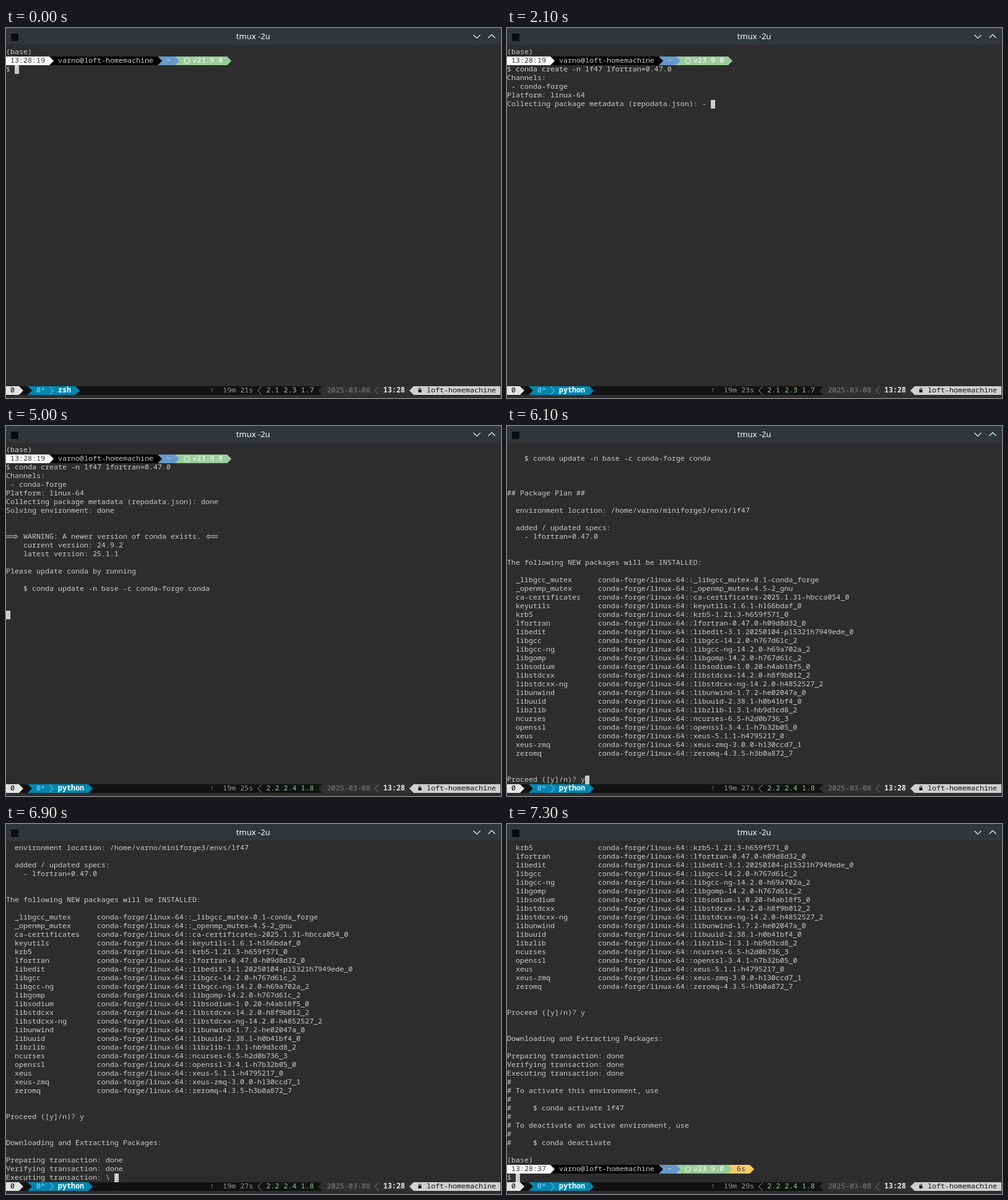
An HTML page that plays this animation: 799 by 597 pixels, repeating every 8 s.

```html
<!DOCTYPE html>
<html lang="en">
<head>
<meta charset="utf-8">
<title>Terminal</title>
<style>
  html, body { margin: 0; width: 100%; height: 100%; overflow: hidden; background: #2d2d2d; }
  svg { display: block; }
  text { font: 11.667px "Noto Sans Mono", "DejaVu Sans Mono", monospace; white-space: pre; }
  .bold { font-weight: 700; }
  .title { font: 13px "Noto Sans", "Open Sans", sans-serif; }
</style>
</head>
<body>
<svg id="stage" width="799" height="597" viewBox="0 0 799 597"></svg>
<script>
const NS = 'http://www.w3.org/2000/svg';
const LOOP = 8000, CW = 7, CH = 14, ROWS = 39, TOP = 32;
const FG = '#cccccc', GREEN = '#99cc99', BLUE = '#6699cc', YELLOW = '#ffcc66', BG = '#2d2d2d';
const USER = 'varno', HOST = 'loft-homemachine';
const stage = document.getElementById('stage');

function add(parent, tag, attrs = {}, text) {
  const el = document.createElementNS(NS, tag);
  for (const k in attrs) el.setAttribute(k, attrs[k]);
  if (text !== undefined) el.textContent = text;
  return parent.appendChild(el);
}
const put = (g, col, text, fill = FG, cls = '') =>
  add(g, 'text', { x: col * CW, y: 10, fill, class: cls }, text);
const stroke = (g, d, color, width = 1) =>
  add(g, 'path', { d, fill: 'none', stroke: color, 'stroke-width': width });
const rightSeg = (from, to) =>
  `M${from * CW} 0H${to * CW}l${CW} 7l${-CW} 7H${from * CW}z`;
const leftSeg = (from, to) =>
  `M${to * CW} 0H${(from + 1) * CW}l${-CW} 7l${CW} 7H${to * CW}z`;
const fillPath = (g, d, fill) => add(g, 'path', { d, fill });

// Transcript
const packages = `_libgcc_mutex 0.1-conda_forge
_openmp_mutex 4.5-2_gnu
ca-certificates 2025.1.31-hbcca054_0
keyutils 1.6.1-h166bdaf_0
krb5 1.21.3-h659f571_0
lfortran 0.47.0-h09d8d32_0
libedit 3.1.20250104-pl5321h7949ede_0
libgcc 14.2.0-h767d61c_2
libgcc-ng 14.2.0-h69a702a_2
libgomp 14.2.0-h767d61c_2
libsodium 1.0.20-h4ab18f5_0
libstdcxx 14.2.0-h8f9b012_2
libstdcxx-ng 14.2.0-h4852527_2
libunwind 1.7.2-he02047a_0
libuuid 2.38.1-h0b41bf4_0
libzlib 1.3.1-hb9d3cd8_2
ncurses 6.5-h2d0b736_3
openssl 3.4.1-h7b32b05_0
xeus 5.1.1-h4795217_0
xeus-zmq 3.0.0-h130ccd7_1
zeromq 4.3.5-h3b0a872_7`.split('\n').map(p => {
  const [name, build] = p.split(' ');
  return '  ' + name.padEnd(19) + `conda-forge/linux-64::${name}-${build}`;
});
const COMMAND = '$ conda create -n lf47 lfortran=0.47.0';
const COLLECT = 'Collecting package metadata (repodata.json): ';
const SOLVE = 'Solving environment: ';
const PROCEED = 'Proceed ([y]/n)? ';
const PREPARE = 'Preparing transaction: ';
const VERIFY = 'Verifying transaction: ';
const EXECUTE = 'Executing transaction: ';

const lines = [
  '(base)',
  { clock: '13:28:19' },
  COMMAND,
  'Channels:',
  ' - conda-forge',
  'Platform: linux-64',
  COLLECT + 'done',
  SOLVE + 'done',
  '', '',
  { notice: 'WARNING: A newer version of conda exists.' },
  '    current version: 24.9.2',
  '    latest version: 25.1.1',
  '',
  'Please update conda by running',
  '',
  '    $ conda update -n base -c conda-forge conda',
  '', '', '',
  '## Package Plan ##',
  '',
  `  environment location: /home/${USER}/miniforge3/envs/lf47`,
  '',
  '  added / updated specs:',
  '    - lfortran=0.47.0',
  '', '',
  'The following NEW packages will be INSTALLED:',
  '',
  ...packages,
  '', '',
  PROCEED + 'y',
  '', '',
  'Downloading and Extracting Packages:',
  '',
  PREPARE + 'done',
  VERIFY + 'done',
  EXECUTE + 'done',
  '#',
  '# To activate this environment, use',
  '#',
  '#     $ conda activate lf47',
  '#',
  '# To deactivate an active environment, use',
  '#',
  '#     $ conda deactivate',
  '',
  '(base)',
  { clock: '13:28:37', took: '6s' },
];

// [start ms, finished lines, text on the cursor line]
const output = [
  [0, 2, '$ '],
  [700, 2, COMMAND],
  [1400, 3, ''],
  [2100, 6, COLLECT + '- '],
  [2400, 6, COLLECT + '\\ '],
  [4000, 6, COLLECT + '| '],
  [4700, 7, SOLVE + '- '],
  [4900, 8, ''],
  [5000, 19, ''],
  [5100, 53, PROCEED],
  [6100, 53, PROCEED + 'y'],
  [6300, 58, PREPARE + '- '],
  ...[...'|/-\\'].map((c, i) => [6400 + i * 100, 59, VERIFY + c + ' ']),
  ...[...'-\\|'].map((c, i) => [6800 + i * 100, 60, EXECUTE + c + ' ']),
  [7100, 61, ''],
  [7200, 70, ''],
  [7300, 72, '$ '],
];
const uptime = [[0, 21], [500, 22], [1200, 23], [2200, 24], [3200, 25], [5200, 27], [7200, 29]];
const at = (steps, t) => steps.findLast(s => s[0] <= t);

function setLine(el, s) {
  el.textContent = '';
  const prompt = s.startsWith('$ ');
  if (prompt) add(el, 'tspan', { fill: GREEN }, '$');
  add(el, 'tspan', {}, prompt ? s.slice(1) : s);
}

function drawPrompt(g, { clock, took }) {
  if (took) fillPath(g, rightSeg(51, 56), YELLOW);
  fillPath(g, rightSeg(39, 51), GREEN);
  fillPath(g, rightSeg(35, 39), BLUE);
  fillPath(g, rightSeg(10, 35), '#000');
  fillPath(g, rightSeg(0, 10), '#fff');
  put(g, 1, clock, BG);
  put(g, 12, `${USER}@${HOST}`);
  put(g, 37, '~', '#eee');
  stroke(g, 'M292 2.4l4 2.3v4.6l-4 2.3l-4 -2.3v-4.6z', '#fff');
  put(g, 43, 'v23.9.0', '#fff');
  if (took) put(g, 53, took, BG);
}

function drawNotice(g, text) {
  const arrow = 'M0 5H16.5M0 8H16.5M14.5 3l4.5 3.5l-4.5 3.5';
  stroke(g, arrow, FG);
  put(g, 4, text);
  stroke(g, arrow, FG).setAttribute('transform', 'translate(342 0) scale(-1 1)');
}

// Window
add(stage, 'rect', { width: 799, height: 597, fill: BG });
add(stage, 'rect', { width: 799, height: 27, fill: '#31363b' });
add(stage, 'rect', { x: 8, y: 9, width: 12, height: 12, fill: '#0c0c0c' });
add(stage, 'text', { x: 399, y: 18, fill: '#fcfcfc', 'text-anchor': 'middle', class: 'title' }, 'tmux -2u');
stroke(stage, 'M754.5 11l5.5 5.5l5.5 -5.5M778.5 16l5.5 -5.5l5.5 5.5', '#fcfcfc', 1.1);

// Scrolling pane
const pane = add(stage, 'svg', { y: TOP, width: 799, height: ROWS * CH, overflow: 'hidden' });
const scroller = add(pane, 'g');
const rows = lines.map((line, i) => {
  const g = add(scroller, 'g', { transform: `translate(0 ${i * CH})` });
  if (line.clock) drawPrompt(g, line);
  else if (line.notice) drawNotice(g, line.notice);
  else setLine(put(g, 0, ''), line);
  return g;
});
const active = add(scroller, 'g');
const activeText = put(active, 0, '');
const cursor = add(active, 'rect', { width: CW, height: CH, fill: FG });

// Status bar
const bar = add(stage, 'g', { transform: `translate(0 ${TOP + ROWS * CH})` });
add(bar, 'rect', { width: 798, height: CH, fill: '#121212' });
const tab = fillPath(bar, '', '#0087af');
fillPath(bar, rightSeg(4, 5), '#121212');
const session = fillPath(bar, rightSeg(0, 3), '');
const sessionText = put(bar, 1, '0');
put(bar, 7, '0*', '#87d7ff');
stroke(bar, 'M70.5 0.5l6 6.5l-6 6.5', '#87d7ff');
const tabText = put(bar, 12, '', '#fff', 'bold');
put(bar, 47, '↑', '#9e9e9e');
const upText = put(bar, 50, '', '#9e9e9e');
stroke(bar, 'M412.5 0.5l-6 6.5l6 6.5', '#9e9e9e');
const loadText = put(bar, 60, '', GREEN);
fillPath(bar, leftSeg(72, 94), '#303030');
put(bar, 74, '2025-03-08', '#808080');
stroke(bar, 'M601.5 0.5l-6 6.5l6 6.5', '#808080');
put(bar, 87, '13:28', '#e4e4e4', 'bold');
fillPath(bar, leftSeg(93, 114), '#d0d0d0');
fillPath(bar, 'M665.5 5.5h5v4.5h-5z', '#121212');
stroke(bar, 'M666.5 6v-1.5a1.5 1.5 0 0 1 3 0v1.5', '#121212');
put(bar, 97, HOST, '#121212');

function draw(t) {
  const [, done, tail] = at(output, t);
  rows.forEach((g, i) => g.setAttribute('display', i < done ? 'inline' : 'none'));
  scroller.setAttribute('transform', `translate(0 ${-CH * Math.max(0, done + 1 - ROWS)})`);
  active.setAttribute('transform', `translate(0 ${done * CH})`);
  setLine(activeText, tail);
  cursor.setAttribute('x', tail.length * CW);

  const prefix = t >= 400 && t < 800;
  session.setAttribute('fill', prefix ? '#0087af' : '#e4e4e4');
  sessionText.setAttribute('fill', prefix ? '#e4e4e4' : '#000');
  const name = t < 2100 ? 'zsh' : 'python';
  tabText.textContent = name;
  tab.setAttribute('d', rightSeg(5, 13 + name.length));
  upText.textContent = `19m ${at(uptime, t)[1]}s`;
  loadText.textContent = t < 3200 ? '2.1 2.3 1.7' : '2.2 2.4 1.8';
}

const start = performance.now();
function tick() {
  draw((performance.now() - start) % LOOP);
  requestAnimationFrame(tick);
}
tick();
</script>
</body>
</html>
```
